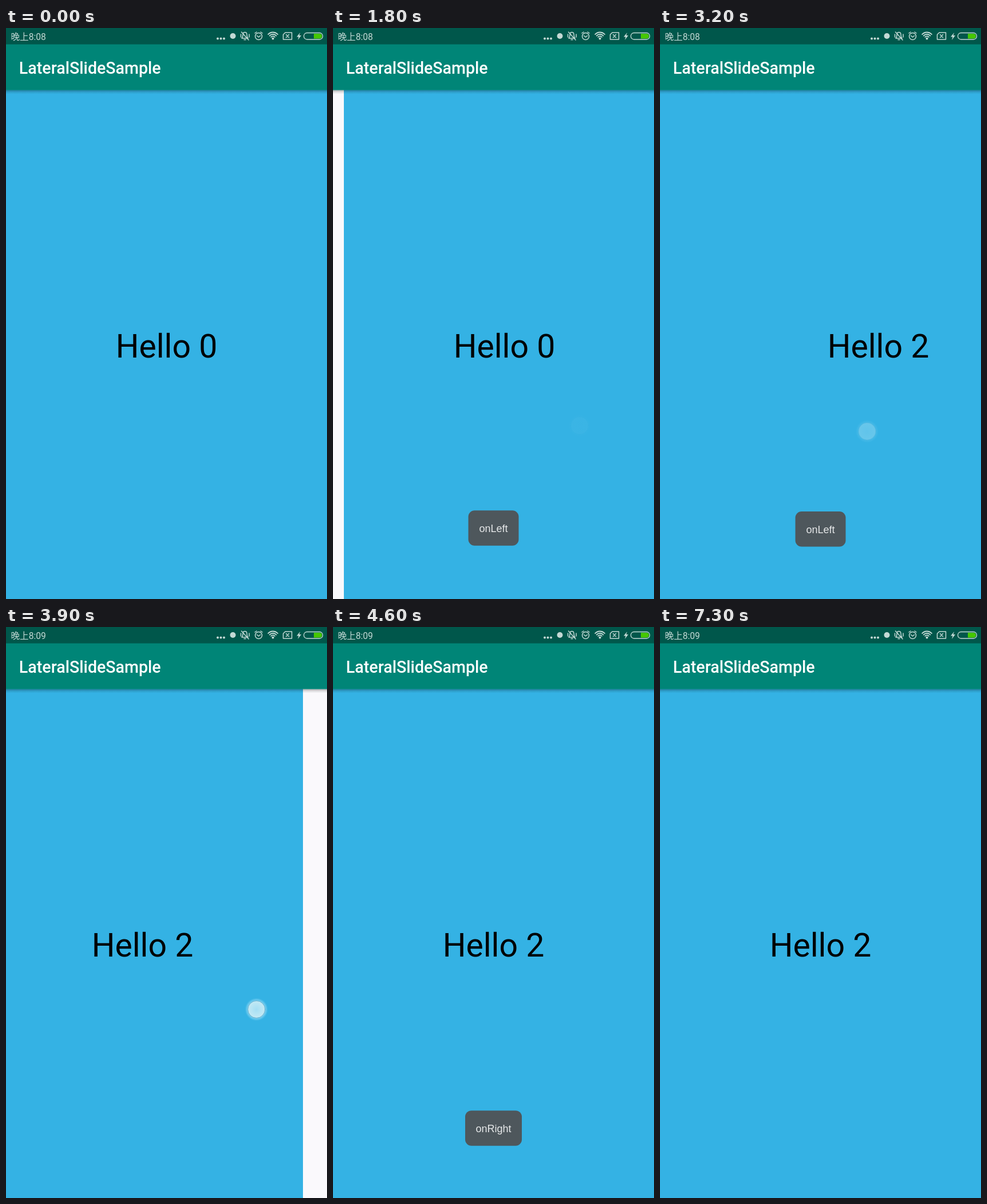
These frames come from a looping animation (561 by 998 pixels, 7.4 s). An HTML page with a canvas:

```html
<!DOCTYPE html>
<html lang="en">
<head>
<meta charset="utf-8">
<title>Pager drag</title>
<style>
  html, body { margin: 0; width: 100%; height: 100%; overflow: hidden; background: #faf9fc; }
  canvas { display: block; width: 561px; height: 998px; }
</style>
</head>
<body>
<canvas id="stage" width="561" height="998"></canvas>
<script>
const W = 561, H = 998, LOOP = 7400, STEP = 100;
const DP = W / 392.7;                       // layout unit of the phone screen
const STATUS = 20 * DP, BAR = 76 * DP;
const SETTLE = 370, FADE = 240, PULL = 89, TOAST_LIFE = 1900;
const ICON = '#c4d9d5';
const ctx = document.getElementById('stage').getContext('2d');

// Each drag either turns the page or, at the ends, stretches it and shows a toast.
const drags = [
  { start: 1040, release: 1600, from: 107, to: 431, y: 700, rise: -5, page: 0, toast: 'onLeft', width: 88 },
  { start: 2380, release: 2540, from: 440, to: 362, y: 700, rise: 5, page: 0 },
  { start: 2920, release: 3080, from: 440, to: 362, y: 700, rise: 5, page: 1 },
  { start: 3700, release: 4240, from: 540, to: 210, y: 669, rise: -2, page: 2, toast: 'onRight', width: 99 }
];

const clamp = v => Math.min(1, Math.max(0, v));
const mix = (a, b, k) => a + (b - a) * k;
const smooth = p => p * p * (3 - 2 * p);
const easeOut = (p, power) => 1 - (1 - p) ** power;
const progress = (drag, t) => smooth(clamp((t - drag.start) / (drag.release - drag.start)));

function scrollAt(t) {
  const drag = drags.filter(d => d.start <= t).pop();
  if (!drag) return 0;
  const q = progress(drag, t), settle = clamp((t - drag.release) / SETTLE);
  const rest = drag.page * W;
  if (drag.toast) {
    const pull = PULL * Math.sin(q * Math.PI / 2) * Math.sign(drag.from - drag.to);
    return rest + pull * (1 - easeOut(settle, 2));
  }
  return rest + mix((drag.from - drag.to) * q, W, easeOut(settle, 4));
}

function label(text, x, y, font, color, align = 'left') {
  ctx.font = font;
  ctx.fillStyle = color;
  ctx.textAlign = align;
  ctx.fillText(text, x, y);
}

function rect(x, y, w, h, color) {
  ctx.fillStyle = color;
  ctx.fillRect(x, y, w, h);
}

function disc(x, y, r, color) {
  ctx.fillStyle = color;
  ctx.beginPath();
  ctx.arc(x, y, r, 0, 7);
  ctx.fill();
}

function line(d, width = 1.5) {
  ctx.lineWidth = width;
  ctx.stroke(new Path2D(d));
}

function roundRect(x, y, w, h, r) {
  ctx.beginPath();
  ctx.roundRect(x, y, w, h, r);
}

function drawPages(scroll) {
  rect(0, 0, W, H, '#faf9fc');
  for (let i = 0; i < 3; i++) {
    const x = Math.round(i * W - scroll);
    if (Math.abs(x) >= W) continue;
    rect(x, STATUS, W, H, '#34b2e4');
    label('Hello ' + i, x + W / 2, 576, `${40 * DP}px Roboto, sans-serif`, '#000', 'center');
  }
}

function drawStatusIcons() {
  ctx.strokeStyle = ICON;
  ctx.lineCap = ctx.lineJoin = 'round';
  for (let i = 0; i < 3; i++) disc(370 + i * 5.5, 18.5, 2, ICON);
  disc(396.5, 14, 5, ICON);
  // muted bell
  line('M412 18h11c-2-2-2-4-2-6c0-6-7-6-7 0c0 2 0 4-2 6M416 20.5h3M411.5 7L424 21M410.5 11v5M425 11v5');
  // alarm clock
  ctx.beginPath();
  ctx.arc(441.5, 14.5, 6, 0, 7);
  ctx.stroke();
  line('M438.5 13.5l3 2.5l3-2.5M435 9l3-2M448 9l-3-2');
  // wireless signal
  for (let i = 0; i < 3; i++) {
    ctx.lineWidth = 1.8;
    ctx.beginPath();
    ctx.arc(466.5, 19, 4.5 + i * 3.5, -Math.PI * 0.76, -Math.PI * 0.24);
    ctx.stroke();
  }
  disc(466.5, 18.5, 2, ICON);
  // missing SIM
  line('M488 8H499.5V20H484.5V11.5ZM489.5 11.5l5 5M494.5 11.5l-5 5');
  // charging battery
  ctx.fillStyle = ICON;
  ctx.fill(new Path2D('M514 8L508 15.5H511.5L510 21L516 13H512.5Z'));
  roundRect(520.5, 8.5, 33, 11.5, 5.5);
  ctx.lineWidth = 1.3;
  ctx.stroke();
  ctx.fillStyle = '#46c800';
  roundRect(538, 10, 14, 8.5, [0, 4, 4, 0]);
  ctx.fill();
}

function drawBars(t) {
  const shade = ctx.createLinearGradient(0, BAR, 0, BAR + 7);
  shade.addColorStop(0, 'rgba(0,0,0,.34)');
  shade.addColorStop(0.4, 'rgba(0,0,0,.13)');
  shade.addColorStop(1, 'rgba(0,0,0,0)');
  rect(0, BAR, W, 7, shade);
  rect(0, 0, W, BAR, '#008577');
  rect(0, 0, W, STATUS, '#00574b');
  label('LateralSlideSample', 16 * DP, 80, `500 ${20 * DP}px Roboto, sans-serif`, '#fff');
  label(t < 3600 ? '晚上8:08' : '晚上8:09', 8.5, 20.5,
    '15.6px Roboto, "Noto Sans CJK SC", "Noto Sans CJK", sans-serif', ICON);
  drawStatusIcons();
}

function drawTouch(drag, t) {
  if (t < drag.start || t > drag.release + FADE) return;
  const q = progress(drag, t);
  const x = mix(drag.from, drag.to, q), y = drag.y + drag.rise * q;
  ctx.globalAlpha = (1 - clamp((t - drag.release) / FADE)) ** 2;
  const glow = ctx.createRadialGradient(x, y, 14, x, y, 20);
  glow.addColorStop(0, 'rgba(175,230,250,.7)');
  glow.addColorStop(1, 'rgba(175,230,250,0)');
  disc(x, y, 20, glow);
  const body = ctx.createRadialGradient(x, y, 0, x, y, 15);
  body.addColorStop(0, '#a5dff4');
  body.addColorStop(1, '#c3e9f4');
  disc(x, y, 15, body);
  ctx.strokeStyle = 'rgba(70,150,185,.65)';
  ctx.lineWidth = 1;
  ctx.stroke();
  ctx.globalAlpha = 1;
}

function drawToast({ toast, width, release }, t) {
  const age = t - release;
  if (!toast || age <= 0) return;
  const bounce = 30 * Math.exp(-age / 70) * Math.cos(Math.PI * age / 200);
  ctx.globalAlpha = clamp(age / 100) * (1 - clamp((age - TOAST_LIFE) / 300));
  ctx.fillStyle = '#4e575c';
  roundRect((W - width) / 2, 845 + bounce, width, 61.5, 11);
  ctx.fill();
  label(toast, W / 2, 883 + bounce, '18px "Liberation Sans", Arial, sans-serif', '#e6e8e9', 'center');
  ctx.globalAlpha = 1;
}

function draw(t) {
  drawPages(scrollAt(t));
  drawBars(t);
  for (const drag of drags) {
    drawToast(drag, t);
    drawTouch(drag, t);
  }
}

const began = performance.now();
function tick() {
  const t = (performance.now() - began) % LOOP;
  draw(Math.floor(t / STEP) * STEP);
  requestAnimationFrame(tick);
}
tick();
</script>
</body>
</html>
```
